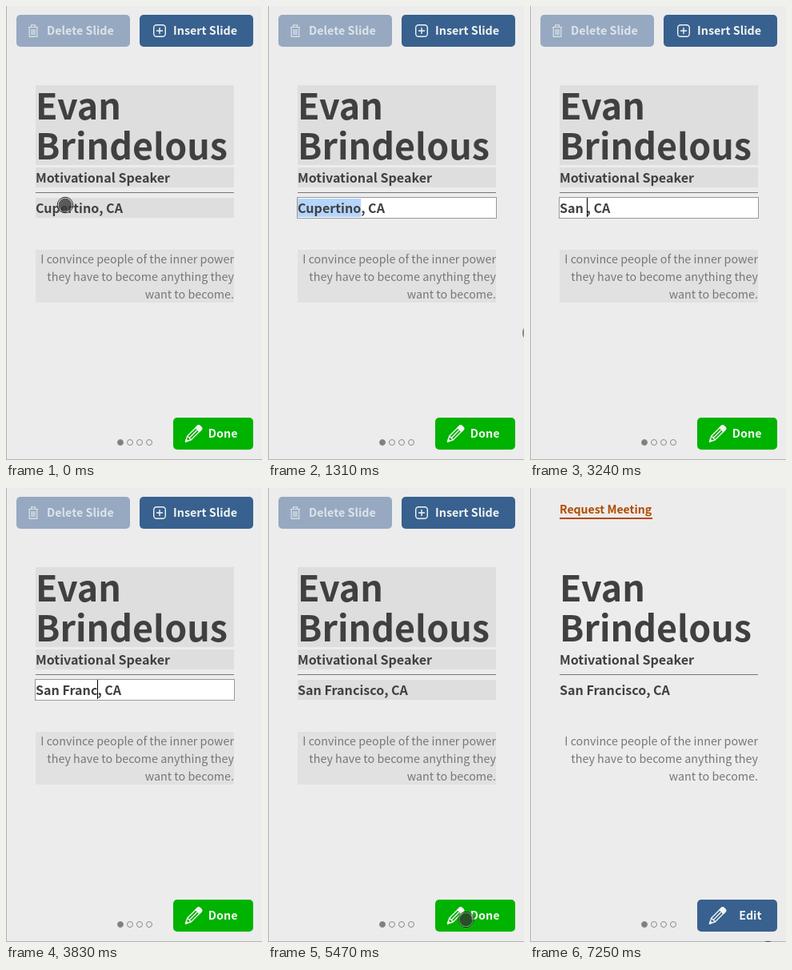
Animation of 320x568 px, one loop 7.32 s. Source, as an HTML page:

```html
<!DOCTYPE html>
<html lang="en">
<head>
<meta charset="utf-8">
<title>Slide editor</title>
<style>
  html, body { margin: 0; width: 100%; height: 100%; overflow: hidden; background: #ececec; }
  svg { display: block; width: 320px; height: 568px; }
  text {
    font: 700 14.32px "Noto Sans CJK JP", "Noto Sans CJK SC", "Noto Sans CJK", "Noto Sans", sans-serif;
    fill: #404040;
  }
  .title { font-size: 44.75px; }
  .sub { font-size: 16.1px; }
  .body { font-weight: 400; fill: #777; text-anchor: end; }
  .link { font-size: 14.05px; fill: #b34a00; }
  .btn { fill: #f2f4f2; }
  .end { text-anchor: end; }
  .dim { fill: #dde3ea; }
  .icon { fill: none; stroke: #f2f4f2; stroke-width: 1.4; stroke-linejoin: round; }

  .edit, .view, .field, .pointer, .edge {
    animation: 7320ms step-end infinite;
  }
  .edit { animation-name: edit; }
  .view { animation-name: view; }
  .field { animation-name: field; }
  .edge { animation-name: edge; }
  .pointer { animation-name: pointer; }

  @keyframes edit {
    0% { visibility: visible; }
    76.63%, 100% { visibility: hidden; }
  }
  @keyframes view {
    0% { visibility: hidden; }
    76.63%, 100% { visibility: visible; }
  }
  @keyframes field {
    0% { visibility: hidden; }
    1.91% { visibility: visible; }
    68.71%, 100% { visibility: hidden; }
  }
  @keyframes edge {
    0% { opacity: 0; }
    76.63% { opacity: 1; }
    84.83% { opacity: .5; }
    86.74%, 100% { opacity: 0; }
  }
  @keyframes pointer {
    0% { transform: translate(74px, 249px); }
    3.96% { transform: translate(80px, 254px); }
    5.87% { transform: translate(160px, 312px); }
    7.92% { transform: translate(278px, 390px); }
    9.83% { transform: translate(328.5px, 409px); }
    21.85% { transform: translate(350px, 420px); }
    72.95% { transform: translate(283px, 492px); }
    74.72% { transform: translate(247.5px, 540px); }
    76.63% { transform: translate(247px, 539px); }
    78.68% { transform: translate(264px, 557px); }
    80.73% { transform: translate(290px, 585px); }
    99.04%, 100% { transform: translate(297.5px, 577.3px); }
  }
</style>
</head>
<body>
<svg viewBox="0 0 320 568">
  <defs>
    <g id="pencil" class="icon" transform="translate(224.5 545) rotate(-45)">
      <path d="M0 0L6.5-3.3H24q2.4 0 2.4 2.4V.9q0 2.4-2.4 2.4H6.5ZM6.5-3.3V3.3M6.5 0H20"/>
      <path d="M21-3.3h3q2.4 0 2.4 2.4V.9q0 2.4-2.4 2.4H21ZM0 0L2.6-1.3V1.3Z" fill="#f2f4f2"/>
    </g>
  </defs>

  <rect width="320" height="568" fill="#ececec"/>
  <path d="M.5 0V568M0 567.5H320" stroke="#b2b2b2"/>
  <path class="edge" d="M13 567.5H320" stroke="#808080"/>

  <g class="edit">
    <rect x="13" y="11" width="142" height="40" rx="5" fill="#97a9c1"/>
    <g class="icon" style="stroke: #dde3ea; stroke-width: 1.2">
      <path d="M28 26.5H40M31.5 26V23.8H36.5V26M29.2 27V38.4H38.8V27M32 29V36.3M34 29V36.3M36 29V36.3"/>
    </g>
    <text class="dim" x="51" y="36">Delete Slide</text>

    <rect x="167" y="11" width="142" height="40" rx="5" fill="#38618f"/>
    <g class="icon">
      <rect x="184.7" y="23.7" width="14.6" height="14.6" rx="3.5"/>
      <path d="M192 27V35M188 31H196"/>
    </g>
    <text class="btn" x="209" y="36">Insert Slide</text>

    <g fill="#dedede">
      <rect x="37" y="99" width="248" height="100"/>
      <rect x="37" y="202" width="248" height="25"/>
      <rect x="37" y="240" width="248" height="25"/>
    </g>
    <rect x="37" y="305" width="248" height="66" fill="#e1e1e1"/>

    <rect x="209" y="515" width="100" height="40" rx="5" fill="#00b300"/>
    <use href="#pencil"/>
    <text class="btn end" x="289.5" y="540">Done</text>
  </g>

  <g class="view">
    <text class="link" x="37" y="32">Request Meeting</text>
    <rect x="37" y="37" width="116" height="2" fill="#b34a00"/>
    <rect x="209" y="515" width="100" height="40" rx="5" fill="#38618f"/>
    <use href="#pencil"/>
    <text class="btn end" x="289.5" y="540">Edit</text>
  </g>

  <text class="title" x="37" y="142">Evan</text>
  <text class="title" x="37" y="192">Brindelous</text>
  <text class="sub" x="37" y="221">Motivational Speaker</text>
  <path d="M37 233.5H285" stroke="#777"/>

  <g class="field">
    <rect x="36.5" y="239.5" width="249" height="26" fill="#fff" stroke="#999"/>
    <rect id="mark" x="37" y="241" height="23" fill="#b5d5fd"/>
  </g>
  <text id="place" class="sub" x="37" y="259">Cupertino, CA</text>
  <rect id="caret" y="240" width="1" height="24" fill="#000"/>

  <text class="body" x="285" y="322">I convince people of the inner power</text>
  <text class="body" x="285" y="344">they have to become anything they</text>
  <text class="body" x="285" y="366">want to become.</text>

  <g fill="none" stroke="#8a8a8a">
    <circle cx="143" cy="546" r="3.5" fill="#808080"/>
    <circle cx="155" cy="546" r="3.5"/>
    <circle cx="167" cy="546" r="3.5"/>
    <circle cx="179" cy="546" r="3.5"/>
  </g>

  <g class="pointer" id="pointer">
    <circle r="10.6" fill="#fff" fill-opacity=".4"/>
    <circle r="9.8" fill="none" stroke="#000" stroke-opacity=".85"/>
    <circle r="8.4" fill="#000" fill-opacity=".62"/>
  </g>
</svg>

<script>
  const LOOP = 7320;
  const byId = id => document.getElementById(id);
  const place = byId('place'), caret = byId('caret'), mark = byId('mark');

  // start time, city, caret shown, city selected
  const steps = [
    [0, 'Cupertino'],
    [290, 'Cupertino', false, true],
    [1310, 'S', true],
    [1750, 'S'],
    [2360, 'S', true],
    [2500, 'Sa', true],
    [2650, 'San', true],
    [2790, 'San ', true],
    [3240, 'San F', true],
    [3390, 'San Fra', true],
    [3530, 'San Franc', true],
    [3830, 'San Franci', true],
    [3980, 'San Francis', true],
    [4130, 'San Francisco', true],
    [4580, 'San Francisco']
  ];

  // Typing shares the clock of the CSS animations.
  const clock = byId('pointer').getAnimations()[0];

  function draw() {
    const t = (clock.currentTime || 0) % LOOP;
    const [, city, blink, selected] = steps.findLast(s => s[0] <= t + 0.5);
    place.textContent = city + ', CA';
    const width = place.getSubStringLength(0, city.length);
    caret.setAttribute('x', Math.round(37 + width));
    caret.setAttribute('opacity', blink ? 1 : 0);
    mark.setAttribute('width', selected ? width : 0);
    requestAnimationFrame(draw);
  }
  draw();
</script>
</body>
</html>
```
